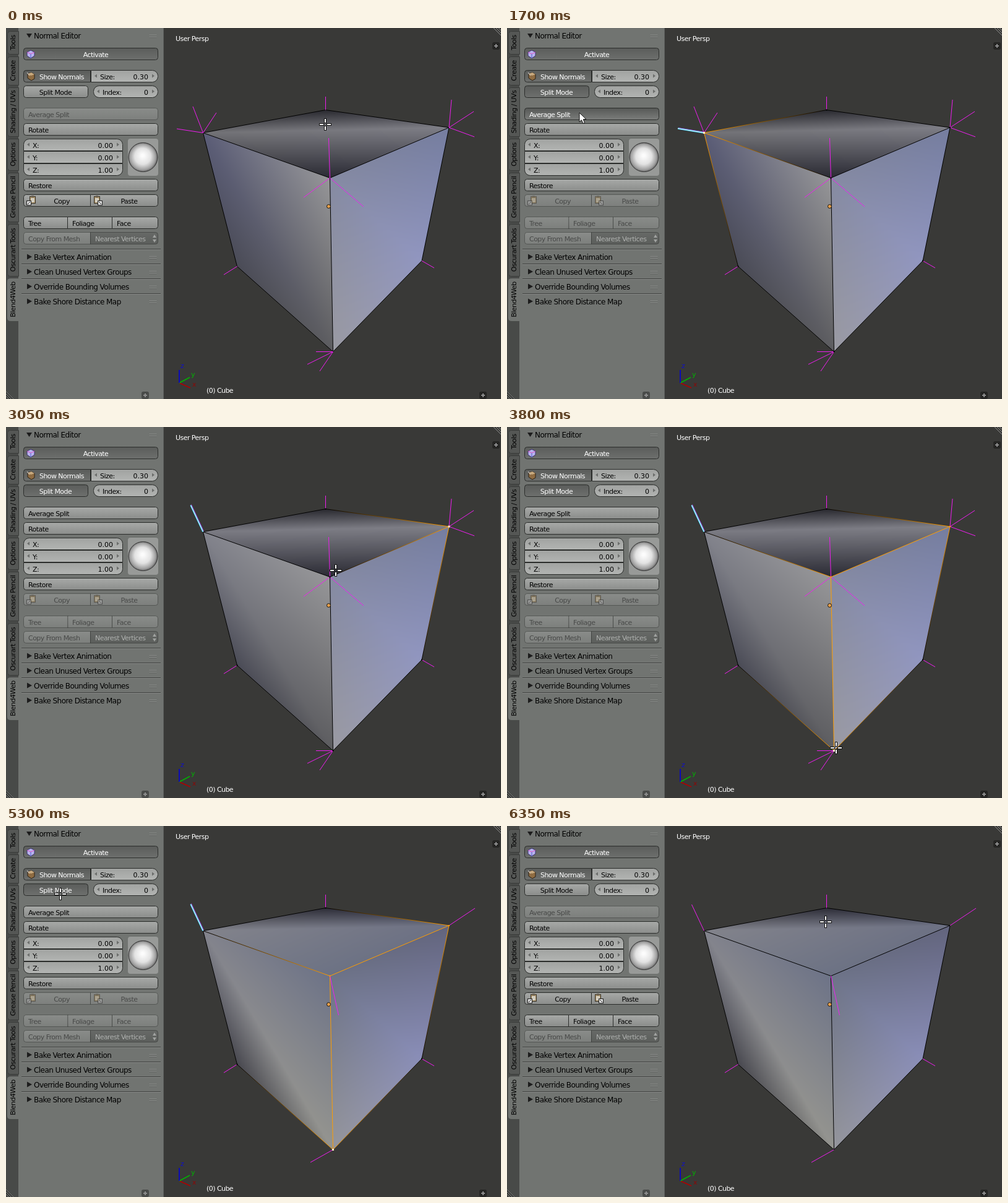
Write an HTML page with a canvas that moves like this. It is 800 px wide and 600 px high and loops after 6400 ms.

```html
<!DOCTYPE html>
<html>
<head>
<meta charset="utf-8">
<style>
html, body { margin: 0; width: 100%; height: 100%; overflow: hidden; background: #393937; }
canvas { display: block; }
</style>
</head>
<body>
<canvas id="stage" width="800" height="600"></canvas>
<script>
const stage = document.getElementById('stage');
const c = stage.getContext('2d');
const LOOP = 6400, STEP = 50;
const SPLIT_ON = 1150, SPLIT_OFF = 5500;

// ---------- cube ----------
const V = { A: [318.5, 169.5], B: [516.5, 132.5], C: [716, 161], D: [523.5, 242.5],
            E: [373.5, 385.5], F: [528.5, 523.5], G: [672, 376.5] };
const EDGES = ['AB', 'BC', 'CD', 'DA', 'AE', 'EF', 'FG', 'GC', 'DF'];
const TRIS = ['ABC', 'ACD', 'ADF', 'AFE', 'DCG', 'DGF'];

// Corner colours for the top, left and right face in each shading stage
const top0 = { A: '727276', B: '28282e', C: '7e7e86', D: '2a2a33' };
const left0 = { A: '5b5d77', D: '969698', E: '4a4b56', F: '5d5d60' };
const right0 = { D: '858aa2', C: '757d9f', G: '9196c0', F: '9a9aa2' };
const SHADES = [
  [top0, left0, right0],
  [{ ...top0, A: '7a7a82' }, { ...left0, A: '82838c' }, right0],
  [{ A: '82838b', B: '2c2c36', C: '6d7184', D: '6c7284' },
   { A: '82838c', D: '6d7387', E: '48484f', F: '94948f' },
   { D: '6d7387', C: '62647d', G: '8a8eb8', F: '94959b' }]
];
const rgb = hex => [0, 2, 4].map(i => parseInt(hex.slice(i, i + 2), 16));

function shadeCube(faces) {
  const layer = document.createElement('canvas');
  layer.width = 800;
  layer.height = 600;
  const g = layer.getContext('2d'), img = g.createImageData(800, 600);
  TRIS.forEach((tri, n) => {
    const [p, q, r] = [...tri].map(k => V[k]);
    const cols = [...tri].map(k => rgb(faces[n >> 1][k]));
    const det = (q[1] - r[1]) * (p[0] - r[0]) + (r[0] - q[0]) * (p[1] - r[1]);
    for (let y = 130; y < 526; y++) for (let x = 316; x < 719; x++) {
      const dx = x + .5 - r[0], dy = y + .5 - r[1];
      const u = ((q[1] - r[1]) * dx + (r[0] - q[0]) * dy) / det;
      const v = ((r[1] - p[1]) * dx + (p[0] - r[0]) * dy) / det;
      const w = 1 - u - v;
      if (u < 0 || v < 0 || w < 0) continue;
      const i = (y * 800 + x) * 4;
      for (let k = 0; k < 3; k++) img.data[i + k] = u * cols[0][k] + v * cols[1][k] + w * cols[2][k];
      img.data[i + 3] = 255;
    }
  });
  g.putImageData(img, 0, 0);
  return layer;
}
const cubes = SHADES.map(shadeCube);

const normals0 = { A: [[302, 127], [340, 137], [276, 163]], B: [[516.5, 111]],
  C: [[720, 116], [756, 135], [757, 176]], D: [[521.5, 178], [481, 274], [578, 289]],
  E: [[352, 399]], F: [[501, 523.5], [487, 544], [507, 555]], G: [[692, 388]] };
const normals1 = { ...normals0, A: [[298.5, 127]] };
const normals2 = { ...normals1, C: [[758, 133]], D: [[537.5, 306]], F: [[492, 544]] };
const NORMALS = [normals0, normals1, normals2];

// ---------- timeline ----------
const PATH = [[0, 516, 156], [100, 512, 154], [450, 319, 168], [700, 319, 168], [1150, 82, 110],
  [1350, 88, 110], [1600, 117, 137], [2000, 117, 137], [2500, 707, 173], [2650, 713, 165],
  [2800, 713, 165], [3050, 533, 232], [3200, 523, 246], [3300, 523, 246], [3650, 528, 524],
  [3800, 532, 519], [3900, 522, 483], [4550, 120, 158], [4700, 116, 137], [4900, 116, 137],
  [5200, 95, 120], [5300, 88, 110], [5450, 86, 104], [5800, 322, 160], [5900, 322, 164],
  [6350, 515, 155], [6400, 516, 156]];

function pointer(t) {
  const i = PATH.findIndex(k => k[0] > t);
  const [t0, x0, y0] = PATH[i - 1], [t1, x1, y1] = PATH[i];
  const u = (t - t0) / (t1 - t0), e = u * u * (3 - 2 * u);
  return [Math.round(x0 + (x1 - x0) * e), Math.round(y0 + (y1 - y0) * e)];
}
const selection = t => t < 500 || t >= 5950 ? '' : t < 2700 ? 'A' : t < 3200 ? 'C' : t < 3700 ? 'CD' : 'CDF';
const stageAt = t => t < 1800 ? 0 : t < 4900 ? 1 : 2;
const pressed = t => (t >= 1600 && t < 1800) || (t >= 4700 && t < 4900);

// ---------- drawing helpers ----------
function line(x0, y0, x1, y1, color, width = 1) {
  c.strokeStyle = color;
  c.lineWidth = width;
  c.beginPath();
  c.moveTo(x0, y0);
  c.lineTo(x1, y1);
  c.stroke();
}
function shape(points, fill, stroke) {
  c.beginPath();
  points.forEach(p => c.lineTo(...p));
  c.closePath();
  if (fill) { c.fillStyle = fill; c.fill(); }
  if (stroke) { c.strokeStyle = stroke; c.lineWidth = 1; c.stroke(); }
}
function disc(x, y, r, fill, stroke) {
  c.beginPath();
  c.arc(x, y, r, 0, 7);
  c.fillStyle = fill;
  c.fill();
  if (stroke) { c.strokeStyle = stroke; c.lineWidth = 1; c.stroke(); }
}
function rect(x, y, w, h, fill) {
  c.fillStyle = fill;
  c.fillRect(x, y, w, h);
}
function text(s, x, y, color = '#000', align = 'left', size = 11, spacing = -.55) {
  c.font = size + 'px "DejaVu Sans", sans-serif';
  c.letterSpacing = spacing + 'px';
  c.textAlign = align;
  c.fillStyle = color;
  c.fillText(s, x, y);
}

const STYLES = {
  tool: ['#a8aaa8', '#8a8c8a'], hover: ['#b7b9b7', '#999b99'], on: ['#5a5c5a', '#6e706e'],
  press: ['#555755', '#7c7e7c'], num: ['#a0a2a0', '#b3b5b3'], menu: ['#5d5f5d', '#464846']
};
function box(x, y, w, h, style, radius = 4) {
  const g = c.createLinearGradient(0, y, 0, y + h);
  STYLES[style].forEach((col, i) => g.addColorStop(i, col));
  c.beginPath();
  c.roundRect(x + .5, y + .5, w - 1, h - 1, radius);
  c.fillStyle = g;
  c.fill();
  c.strokeStyle = '#2b2d2b';
  c.lineWidth = 1;
  c.stroke();
}
const L = [4, 0, 0, 4], M = 0, R = [0, 4, 4, 0];

function button(label, x, y, w, { style = 'tool', radius = 4, center, off } = {}) {
  c.globalAlpha = off ? .45 : 1;
  box(x, y, w, 20, style, radius);
  const color = style === 'on' || style === 'press' ? '#fff' : '#000';
  text(label, center || x + 8, y + 15, color, center ? 'center' : 'left');
  c.globalAlpha = 1;
}
function arrows(x, y, w) {
  const a = x + 6, b = x + w - 6;
  shape([[a, y], [a + 4, y - 3], [a + 4, y + 3]], '#6c6e6c');
  shape([[b, y], [b - 4, y - 3], [b - 4, y + 3]], '#6c6e6c');
}
function field(label, value, x, y, w, radius) {
  box(x, y, w, 20, 'num', radius);
  arrows(x, y + 9.5, w);
  text(label, x + 15, y + 15);
  text(value, x + w - 16, y + 15, '#000', 'right', 11, 0);
}
function plus(x, y) {
  c.beginPath();
  c.roundRect(x - 6, y - 6, 12, 12, 3);
  c.fillStyle = 'rgba(0, 0, 0, .35)';
  c.fill();
  rect(x - 3, y - 1, 6, 2, '#8c8c8c');
  rect(x - 1, y - 3, 2, 6, '#8c8c8c');
}
function grip(y) {
  for (let i = 0; i < 6; i++) for (let j = 0; j < 2; j++) {
    rect(232 + i * 2, y - 1 + j * 3, 1, 1, '#a4a6a4');
    rect(232 + i * 2, y + j * 3, 1, 1, '#505250');
  }
}
function clipIcon(x, y, dir) {
  rect(x, y - 6, 10, 12, '#3a342a');
  rect(x + 1, y - 5, 8, 10, '#a58d62');
  rect(x + 2, y - 3, 6, 7, '#d2cdc0');
  rect(x + 3, y - 7, 4, 3, '#6b6254');
  const px = dir < 0 ? x - 5 : x + 6;
  rect(px, y + 1, 8, 8, '#222');
  rect(px + 1, y + 2, 6, 6, '#e0e0e0');
  line(px + 2, dir < 0 ? y + 7 : y + 3, px + 6, dir < 0 ? y + 3 : y + 7, '#222');
}

// ---------- side panel ----------
const TABS = [['Tools', 5, 42], ['Create', 46, 92], ['Shading / UVs', 96, 175], ['Options', 179, 230],
  ['Grease Pencil', 234, 313], ['Oscurart Tools', 317, 401], ['Blend4Web', 405, 473]];
const SECTIONS = ['Bake Vertex Animation', 'Clean Unused Vertex Groups',
  'Override Bounding Volumes', 'Bake Shore Distance Map'];

function drawTabs() {
  rect(0, 0, 20, 600, '#484a48');
  TABS.forEach(([name, y0, y1], i) => {
    const active = i === TABS.length - 1;
    c.beginPath();
    c.roundRect(2.5, y0 + .5, 18, y1 - y0, [4, 0, 0, 4]);
    c.fillStyle = active ? '#717471' : '#555755';
    c.fill();
    c.strokeStyle = active ? '#717471' : '#3a3c3a';
    c.lineWidth = 1;
    c.stroke();
    c.save();
    c.translate(15, (y0 + y1) / 2);
    c.rotate(-Math.PI / 2);
    text(name, 0, 0, '#000', 'center');
    c.restore();
  });
}

function drawPanel(t, x, y) {
  const split = t >= SPLIT_ON && t < SPLIT_OFF;
  const over = top => x > 28 && x < 246 && y >= top && y < top + 20 ? 'hover' : 'tool';
  rect(0, 0, 255, 600, '#717471');
  drawTabs();
  rect(254, 0, 1, 600, '#5e605e');

  shape([[33, 9], [42, 9], [37.5, 16]], '#1c1c1c');
  text('Normal Editor', 45, 17, '#000', 'left', 12);
  grip(12);

  button('Activate', 28, 32, 218, { style: 'on', center: 145 });
  shape([[40, 36], [46, 39], [46, 45], [40, 49], [34, 45], [34, 39]], '#b9b4ee', '#3a3270');
  line(34, 39, 40, 42, '#e050c0');
  line(46, 39, 40, 42, '#e050c0');
  line(40, 42, 40, 49, '#5060d0');

  button('Show Normals', 28, 68, 109, { style: 'on', radius: L, center: 90 });
  shape([[35, 74], [41, 72], [46, 75], [46, 82], [41, 85], [35, 81]], '#8f6c42', '#2c2114');
  shape([[35, 74], [41, 72], [46, 75], [40, 77]], '#c9ab80');
  line(34, 72, 38, 77, '#ddd');
  field('Size:', '0.30', 137, 68, 109, [0, 9, 9, 0]);

  button('Split Mode', 28, 93, 105, { style: split ? 'on' : 'tool', center: 80 });
  field('Index:', '0', 141, 93, 105, 9);

  button('Average Split', 28, 129, 218, { style: pressed(t) ? 'press' : split ? over(130) : 'tool', off: !split });
  button('Rotate', 28, 154, 218, { style: over(155) });

  field('X:', '0.00', 28, 179, 161, [9, 9, 0, 0]);
  field('Y:', '0.00', 28, 199, 161, M);
  field('Z:', '1.00', 28, 219, 161, [0, 0, 9, 9]);
  c.beginPath();
  c.roundRect(197, 179, 49, 60, 4);
  c.fillStyle = '#989a98';
  c.fill();
  const ball = c.createRadialGradient(221, 206, 2, 221, 209, 24);
  ball.addColorStop(0, '#fcfcfc');
  ball.addColorStop(.5, '#e2e2e2');
  ball.addColorStop(.85, '#a0a0a0');
  ball.addColorStop(1, '#606060');
  disc(221.5, 209, 23.5, ball, '#333');

  button('Restore', 28, 244, 218);
  button('Copy', 28, 269, 109, { radius: L, center: 90, off: split });
  button('Paste', 136, 269, 110, { radius: R, center: 199, off: split });
  c.globalAlpha = split ? .5 : 1;
  clipIcon(38, 278, -1);
  clipIcon(142, 278, 1);
  c.globalAlpha = 1;

  button('Tree', 28, 305, 73, { radius: L, off: split });
  button('Foliage', 99, 305, 73, { radius: M, off: split });
  button('Face', 171, 305, 75, { radius: R, off: split });
  button('Copy From Mesh', 28, 330, 109, { radius: L, off: true });
  c.globalAlpha = .5;
  box(136, 330, 110, 20, 'menu', R);
  c.globalAlpha = 1;
  text('Nearest Vertices', 144, 345, '#b0b2b0');
  shape([[237, 339], [243, 339], [240, 334]], '#a0a2a0');
  shape([[237, 342], [243, 342], [240, 347]], '#a0a2a0');

  SECTIONS.forEach((name, i) => {
    const mid = 370 + i * 24;
    rect(25, mid - 13, 225, 1, '#3f413f');
    rect(25, mid - 12, 225, 1, '#868886');
    shape([[34, mid - 4.5], [34, mid + 4.5], [42, mid]], '#1c1c1c');
    text(name, 45, mid + 5, '#000', 'left', 12);
    grip(mid);
  });
  plus(225, 594);
  for (let i = 3; i < 12; i += 4) {
    line(0, 600 - i, i, 600, '#222');
    line(0, 599 - i, i + 1, 600, '#a5a7a5', .6);
  }
}

// ---------- viewport ----------
function drawView(t) {
  const sel = selection(t), stageNo = stageAt(t);
  const lit = t >= SPLIT_ON && t < SPLIT_OFF;
  rect(255, 0, 545, 600, '#393937');
  c.drawImage(cubes[stageNo], 0, 0);

  EDGES.forEach(edge => {
    const [a, b] = [...edge].map(k => V[k]);
    const g = c.createLinearGradient(...a, ...b);
    [...edge].forEach((k, i) => g.addColorStop(i, sel.includes(k) ? '#ff9d00' : '#000'));
    line(...a, ...b, g);
  });

  for (const k in V) {
    NORMALS[stageNo][k].forEach(n => line(...V[k], ...n, '#f01ef0'));
    if (sel) rect(V[k][0] - 1, V[k][1] - 1, 2, 2, sel.includes(k) ? '#ff9d00' : '#000');
  }
  if (lit) {
    const [x, y] = stageNo ? [298.5, 126.5] : [276, 162.5];
    line(V.A[0] + 1, V.A[1] - 1, x + 1, y - 1, '#f01ef0');
    line(...V.A, x, y, '#20c0e8', 2.4);
    line(...V.A, x, y, '#fff', 1);
  }
  if (sel) {
    const [x, y] = V[sel[sel.length - 1]];
    rect(x - 1.5, y - 1.5, 3, 3, '#ffe8c8');
  }
  disc(521.5, 288.5, 3, '#e8a04a', '#111');

  line(280, 574, 298, 582, '#b00000', 1.6);
  line(280, 574, 297, 565, '#00b400', 1.6);
  line(280, 574, 280, 553, '#0000d8', 1.6);
  text('x', 301, 580, '#8c0808');
  text('y', 299, 564, '#00b400');
  text('z', 282, 550, '#1010c8');

  text('User Persp', 274, 21, '#fff');
  text('(0) Cube', 324, 590, '#fff');
  plus(792, 29);
  plus(771, 594);
  for (let i = 4; i < 13; i += 4) line(800 - i, 0, 800, i, '#8c8c8c');
}

// ---------- cursor ----------
function drawCursor(x, y) {
  if (x < 254 && y > 125) {
    const outline = [[0, 0], [0, 15], [3.5, 11.8], [6, 17.5], [8.6, 16.3], [6.2, 10.8], [11, 10.6]];
    shape(outline.map(p => [x + p[0], y + p[1]]), '#fff', '#111');
    return;
  }
  const arms = [[-9, -1, 6, 2], [3, -1, 6, 2], [-1, -9, 2, 6], [-1, 3, 2, 6]];
  arms.forEach(([dx, dy, w, h]) => rect(x + dx - 1, y + dy - 1, w + 2, h + 2, '#111'));
  arms.forEach(([dx, dy, w, h]) => rect(x + dx, y + dy, w, h, '#fff'));
}

const start = performance.now();
function draw() {
  const elapsed = (performance.now() - start) % LOOP;
  const t = Math.floor(elapsed / STEP) * STEP;
  const [x, y] = pointer(t);
  drawView(t);
  drawPanel(t, x, y);
  drawCursor(x, y);
  requestAnimationFrame(draw);
}
draw();
</script>
</body>
</html>
```
